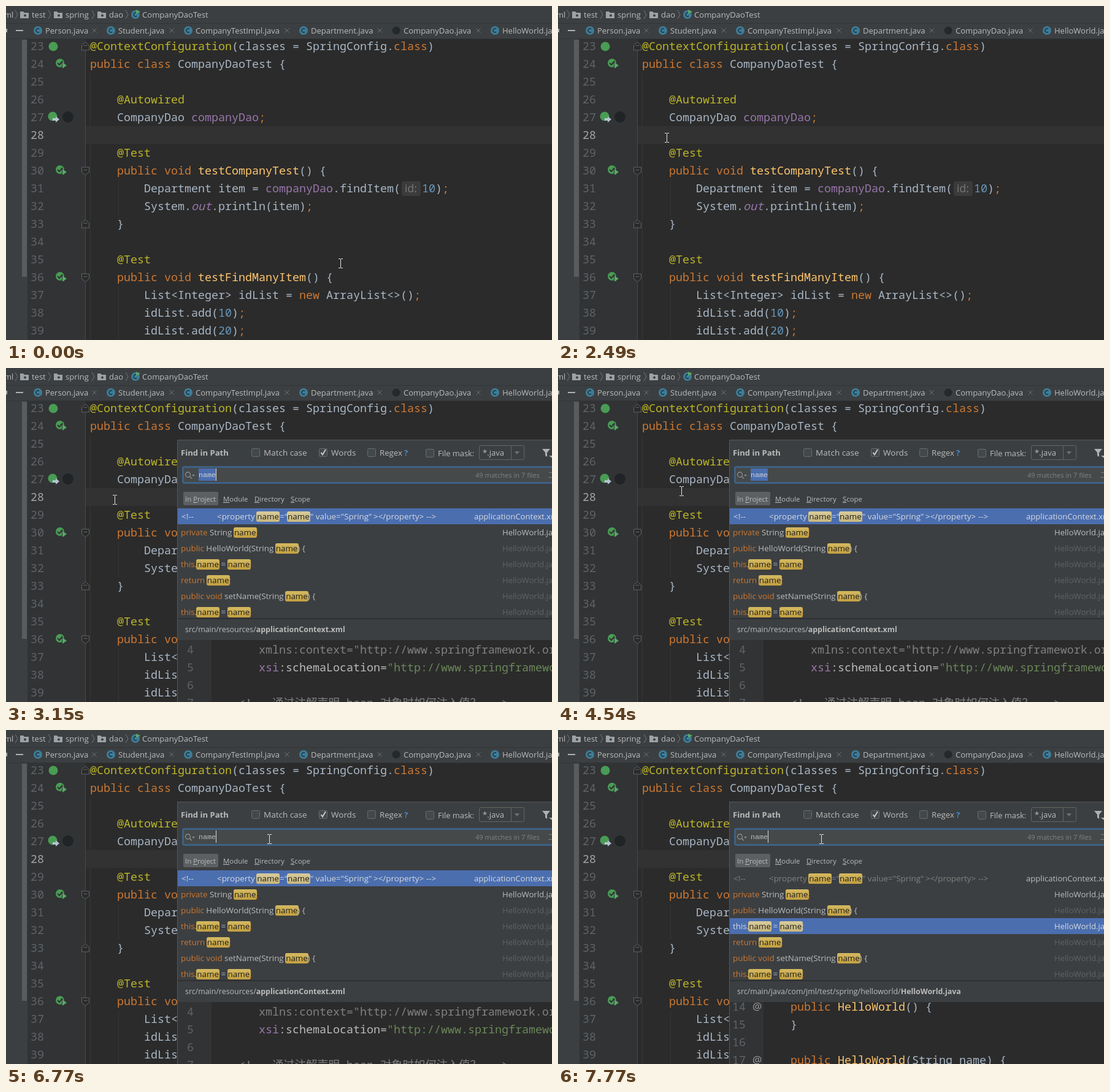
These frames come from a looping animation (890 px wide and 545 px high, 8 s). An HTML page with a canvas:

```html
<!DOCTYPE html>
<html lang="en">
<head>
<meta charset="utf-8">
<title>Find in Path</title>
<style>
html, body { margin: 0; width: 100%; height: 100%; overflow: hidden; background: #2b2b2b; }
canvas { display: block; }
</style>
</head>
<body>
<canvas id="stage" width="890" height="545"></canvas>
<script>
const ctx = document.getElementById('stage').getContext('2d');
const LOOP = 8000, CELL = 11;
const MONO = '"Noto Sans Mono", "Noto Sans CJK SC", "DejaVu Sans Mono", monospace';
const SANS = '"Open Sans", "Noto Sans", sans-serif';
const CODE_FONT = `18.33px ${MONO}`;
const PANEL = '#3c3f41', EDITOR = '#2b2b2b', GUTTER = '#313335', LABEL = '#bbbbbb', GREEN = '#499c54';
const ROW_SIZE = 13.4;
const COLORS = {
  d: '#a9b7c6', k: '#cc7832', a: '#bbb529', f: '#9876aa', m: '#ffc66d', n: '#6897bb',
  c: '#808080', s: '#6a8759', o: '#629755', i: '#9876aa', t: '#629755', x: '#bababa'
};
const STYLES = { i: 'italic ', o: 'italic ', t: 'italic bold ' };

// Styled text: style key and text alternate, separated by backticks.
const pairs = line => {
  const parts = line.split('`'), out = [];
  for (let i = 0; i + 1 < parts.length; i += 2) out.push([parts[i], parts[i + 1]]);
  return out;
};

const SOURCE = [
  'a`@ContextConfiguration`d`(classes = SpringConfig.`k`class`d`)',
  'k`public class `d`CompanyDaoTest {',
  '',
  'a`    @Autowired',
  'd`    CompanyDao `f`companyDao`k`;',
  '',
  'a`    @Test',
  'k`    public void `m`testCompanyTest`d`() {',
  'd`        Department item = `f`companyDao`d`.findItem(',
  'd`        System.`i`out`d`.println(item)`k`;',
  'd`    }',
  '',
  'a`    @Test',
  'k`    public void `m`testFindManyItem`d`() {',
  'd`        List<Integer> idList = `k`new `d`ArrayList<>()`k`;',
  'd`        idList.add(`n`10`d`)`k`;',
  'd`        idList.add(`n`20`d`)`k`;'
];

const XML = {
  4: 'c`       xmlns:context="http://www.springframework.org/schema/context"',
  5: 'f`       xsi`x`:schemaLocation=`s`"http://www.springframework.org/schema/beans',
  7: 'c`    <!-- 通过注解声明 bean 对象时如何注入值？ -->'
};
const JAVA = {
  8: 'o` * `t`@author`o` DORAN',
  9: 'o` */',
  10: 'c`//@Repository',
  11: 'k`public class `d`HelloWorld {',
  12: 'k`    private `d`String `f`name`k`;',
  14: 'k`    public `m`HelloWorld`d`() {',
  15: 'd`    }',
  17: 'k`    public `m`HelloWorld`d`(String name) {',
  18: 'k`        this`d`.`f`name`d` = name`k`;'
};

// A numeric key moves to that x in comment grey; "h" is a highlighted match.
const RESULTS = [
  '286`<!--`344`<property `h`name`446`="`h`name`496`" value="Spring"`599`></property>`685`-->',
  'k`private `d`String `h`name`k`;',
  'k`public `d`HelloWorld(String `h`name`d`) {',
  'k`this`d`.`h`name`d` = `h`name`k`;',
  'k`return `h`name`k`;',
  'k`public void `d`setName(String `h`name`d`) {',
  'k`this`d`.`h`name`d` = `h`name`k`;'
];

const POINTER = [
  [0, 545.5, 420], [70, 530, 414], [200, 470, 385], [350, 330, 310], [480, 220, 245], [620, 150, 219],
  [830, 177.5, 215], [4539, 177.5, 215], [4540, 201.5, 201], [4700, 262, 215], [4850, 320, 229],
  [5050, 380, 222], [5300, 433, 197], [5500, 429.5, 178], [LOOP, 429.5, 178]
];
const EDITOR_CARET = [970, 1500, 1960, 2490];
const FIELD_CARET = [3020, 3480, 4010, 4540, 5070, 5600, 5780, 6310, 6770, 7300, 7770];
const CLICKS = [[900, 1110], [5640, 5850]];

const blinkOn = (toggles, t) => toggles.filter(at => at <= t).length % 2 === 1;
const latest = (steps, t) => steps.filter(([at]) => at <= t).pop()[1];

function rect(x, y, w, h, fill) {
  ctx.fillStyle = fill;
  ctx.fillRect(x, y, w, h);
}

function rounded(x, y, w, h, r, fill, stroke) {
  ctx.beginPath();
  ctx.roundRect(x, y, w, h, r);
  if (fill) { ctx.fillStyle = fill; ctx.fill(); }
  if (stroke) { ctx.strokeStyle = stroke; ctx.lineWidth = 1; ctx.stroke(); }
}

function disc(x, y, r, fill) {
  ctx.beginPath();
  ctx.arc(x, y, r, 0, Math.PI * 2);
  ctx.fillStyle = fill;
  ctx.fill();
}

function trace(points, closed) {
  ctx.beginPath();
  for (let i = 0; i < points.length; i += 2) ctx.lineTo(points[i], points[i + 1]);
  if (closed) ctx.closePath();
}

function line(points, color, width = 1, closed = false) {
  trace(points, closed);
  ctx.strokeStyle = color;
  ctx.lineWidth = width;
  ctx.stroke();
}

function shape(points, fill) {
  trace(points, true);
  ctx.fillStyle = fill;
  ctx.fill();
}

// Draws text around the vertical middle y and returns its width.
function label(text, x, y, size = 13, color = LABEL, weight = '') {
  ctx.font = `${weight} ${size}px ${SANS}`;
  ctx.fillStyle = color;
  ctx.fillText(text, x, y + Math.round(size * 0.38));
  return ctx.measureText(text).width;
}

function code(text, x, y) {
  for (const [key, part] of pairs(text)) {
    ctx.font = (STYLES[key] || '') + CODE_FONT;
    ctx.fillStyle = COLORS[key];
    ctx.fillText(part, x, y + 6);
    x += part.length * CELL;
  }
}

function lineNumber(number, right, y, color = '#606366') {
  ctx.font = CODE_FONT;
  ctx.fillStyle = color;
  ctx.fillText(number, right - String(number).length * CELL, y + 6);
}

function classIcon(x, y) {
  disc(x, y, 7, '#3d7d99');
  ctx.beginPath();
  ctx.arc(x, y, 3, 0.8, Math.PI * 2 - 0.8);
  ctx.strokeStyle = '#22343c';
  ctx.lineWidth = 1.4;
  ctx.stroke();
}

function folder(x, y) {
  shape([x - 7, y - 5, x - 2, y - 5, x, y - 3, x + 7, y - 3, x + 7, y + 6, x - 7, y + 6], '#9da2a6');
  disc(x + 1, y + 1.5, 2, PANEL);
}

function runIcon(x, y) {
  disc(x - 2, y - 1, 7, GREEN);
  line([x - 6, y - 1, x - 3, y + 2, x + 2, y - 4], GUTTER, 2);
  shape([x + 1, y - 3, x + 10, y + 3, x + 1, y + 9], GUTTER);
  shape([x + 2, y - 2, x + 9, y + 3, x + 2, y + 8], '#59a869');
}

function foldMark(y, up) {
  const s = up ? -1 : 1;
  const points = [123.5, y - 6 * s, 135.5, y - 6 * s, 135.5, y + 2 * s, 129.5, y + 7 * s, 123.5, y + 2 * s];
  shape(points, EDITOR);
  line(points, '#606366', 1, true);
  line([126.5, y - 1.5, 132.5, y - 1.5], '#606366');
}

function topBars() {
  rect(0, 0, 890, 54, PANEL);
  rect(0, 28, 890, 1, '#323537');
  rect(0, 53, 890, 1, '#323537');
  label('ml', -3, 14);
  for (const x of [15, 69, 140, 195]) line([x, 7, x + 4, 14, x, 21], '#73777a');
  for (const [x, text] of [[30, 'test'], [85, 'spring'], [156, 'dao']]) {
    folder(x, 14);
    label(text, x + 12, 14);
  }
  classIcon(211, 14);
  shape([212, 6, 219, 9, 212, 13], '#59a869');
  label('CompanyDaoTest', 222, 14, 13.1);

  rect(0, 37, 2, 6, '#afb1b3');
  rect(16, 39, 12, 2, '#afb1b3');
  const tabs = [
    [52, 'Person.java', 144], [171, 'Student.java', 270], [297, 'CompanyTestImpl.java', 458],
    [485, 'Department.java', 609], [636, 'CompanyDao.java', 770], [797, 'HelloWorld.java', 920]
  ];
  for (const [x, text, close] of tabs) {
    if (text === 'CompanyDao.java') disc(x, 40, 6.5, '#24292c');
    else classIcon(x, 40);
    label(text, x + 12, 40);
    line([close - 3.5, 36.5, close + 3.5, 43.5], '#6e7173');
    line([close - 3.5, 43.5, close + 3.5, 36.5], '#6e7173');
  }
}

function editor(t) {
  rect(0, 54, 36, 491, PANEL);
  rect(26, 55, 8, 387, '#595b5d');
  rect(35, 54, 95, 491, GUTTER);
  rect(130, 54, 760, 491, EDITOR);
  rect(130, 196, 760, 29, '#323232');
  rect(129, 66, 1, 479, '#47494a');
  rect(137, 110, 1, 86, '#373737');
  rect(137, 225, 1, 320, '#373737');
  rect(183, 284, 1, 58, '#373737');
  rect(183, 458, 1, 87, '#373737');

  SOURCE.forEach((text, i) => {
    const y = 66 + i * 29;
    lineNumber(23 + i, 62, y, i === 5 ? '#a4a3a3' : undefined);
    code(text, 137, y);
  });
  rounded(645, 286, 31, 24, 4, '#3b3b3b');
  label('id:', 650, 297, 17.5, '#787878');
  code('n`10`d`)`k`;', 678, 298);

  disc(77, 66, 7.5, GREEN);
  for (const y of [94, 268, 442]) runIcon(90, y);
  disc(76, 180, 7.5, GREEN);
  shape([76, 183, 81, 183, 81, 180, 87, 185, 81, 190, 81, 187, 76, 187], '#b5c3d0');
  disc(101, 181, 9, '#202426');
  foldMark(66, true);
  foldMark(269, false);
  foldMark(356, true);
  foldMark(443, false);
  if (blinkOn(EDITOR_CARET, t)) rect(137, 199, 2, 24, '#bbbbbb');
}

function checkbox(x, y, text, size, checked) {
  rounded(x + 0.5, y - 6.5, 13, 13, 2, '#43494a', '#6b6b6b');
  if (checked) line([x + 3.5, y, x + 6, y + 3.5, x + 11, y - 5], '#c8c8c8', 2);
  label(text, x + 20, y, size);
}

function popupHeader(t) {
  label('Find in Path', 285, 138, 13.1, LABEL, 'bold');
  checkbox(400, 138, 'Match case', 13.5);
  checkbox(510, 138, 'Words', 13.5, true);
  checkbox(589, 138, 'Regex', 13.2);
  label('?', 649, 138, 13, '#4a88c7', 'bold');
  checkbox(684, 139, 'File mask:', 12.9);
  rounded(771.5, 126.5, 73, 23, 2, PANEL, '#646464');
  rect(823, 127, 1, 23, '#646464');
  label('*.java', 777, 138);
  shape([829, 136, 837, 136, 833, 141], '#6e7173');
  shape([874, 132, 887, 132, 882, 138, 882, 145, 879, 143, 879, 138], '#afb1b3');
  shape([885, 143, 890, 143, 890, 147], '#afb1b3');

  rounded(287, 160, 620, 29, 4, '#3d6185');
  rounded(290, 163, 620, 23, 1, '#45494a');
  ctx.beginPath();
  ctx.arc(296.5, 174, 4, 0, Math.PI * 2);
  ctx.strokeStyle = '#8b8e90';
  ctx.lineWidth = 1.3;
  ctx.stroke();
  line([299.5, 177, 303, 180.5], '#8b8e90', 1.5);
  shape([303, 174, 308, 174, 305.5, 177], '#8b8e90');
  line([890, 170.5, 885, 170.5], '#7d8082');
  line([890, 178.5, 884, 178.5], '#7d8082');
  if (t < 5780) rect(314, 164, 28, 20, '#4b6eaf');
  ctx.font = '11.7px "Liberation Mono", monospace';
  ctx.fillStyle = t < 5780 ? '#d0d0d0' : LABEL;
  ctx.fillText('name', 314, 178);
  if (blinkOn(FIELD_CARET, t)) rect(342, 164, 1, 20, '#dddddd');

  rounded(289, 202, 57, 22, 2, '#5c6062');
  for (const [x, before, text] of [[292, 'In ', 'Project'], [354, '', 'Module'], [405, '', 'Directory'], [464, '', 'Scope']]) {
    const start = x + label(before, x, 214, 11.4);
    label(text, start, 214, 11.4);
    rect(start, 219, ctx.measureText(text[0]).width, 1, LABEL);
  }
}

function matchBox(x, y, width, selected) {
  const fill = ctx.createLinearGradient(0, y - 8, 0, y + 9);
  fill.addColorStop(0, selected ? '#d8cb9b' : '#d4b961');
  fill.addColorStop(1, selected ? '#c9b77c' : '#c29f40');
  rounded(Math.round(x) - 1, y - 8, Math.round(width) + 2, 17, 3, fill);
}

function results(selected) {
  label('49 matches in 7 files', 765, 175, 11.1, '#808385');
  RESULTS.forEach((text, row) => {
    const y = 242 + row * 26, active = row === selected;
    if (active) rect(280, y - 13, 610, 26, '#4b6eaf');
    let x = 285;
    for (const [key, part] of pairs(text)) {
      if (+key) x = +key;
      const color = key === 'h' ? '#1c1c1c' : active ? '#d6d9de' : +key ? '#808080' : key === 'd' ? LABEL : COLORS[key];
      if (key === 'h') {
        ctx.font = `${ROW_SIZE}px ${SANS}`;
        matchBox(x, y, ctx.measureText(part).width, active);
      }
      x += label(part, x, y, ROW_SIZE, color);
    }
    const fileColor = active ? '#d6d9de' : row < 2 ? LABEL : '#606366';
    if (row) label('HelloWorld.java', 809, y, 13.1, fileColor);
    else label('applicationContext.xml', 763, y, 13.1, fileColor);
  });
}

function preview(first) {
  const isXml = first === 4, lines = isXml ? XML : JAVA;
  const top = isXml ? 460 : 452;
  const path = isXml ? 'src/main/resources/' : 'src/main/java/com/jml/test/spring/helloworld/';
  const width = label(path, 292, 426, 12.4);
  label(isXml ? 'applicationContext.xml' : 'HelloWorld.java', 292 + width, 426, 12.4, LABEL, 'bold');

  ctx.save();
  ctx.beginPath();
  ctx.rect(280, 444, 610, 101);
  ctx.clip();
  rect(280, 444, 55, 101, GUTTER);
  rect(335, 444, 555, 101, EDITOR);
  for (let i = 0; i < 4; i++) {
    const number = first + i, y = top + i * 29, text = lines[number] || '';
    lineNumber(number, 306, y);
    code(text, 335, y);
    if (isXml) continue;
    if (number === 8) rect(368, y + 9, 77, 1, COLORS.o);
    if (number === 10) {
      const wave = [];
      for (let x = 0; x <= 143; x += 2) wave.push(335 + x, y + 9 + (x % 4 ? 2 : 0));
      line(wave, '#85805c');
    }
    if (number === 14 || number === 17) {
      ctx.font = `17px ${SANS}`;
      ctx.fillStyle = '#9da0a2';
      ctx.fillText('@', 317, y + 5);
    }
  }
  ctx.restore();
}

function popup(t) {
  rect(279, 117, 611, 428, '#555759');
  rect(280, 118, 610, 427, PANEL);
  popupHeader(t);
  if (t >= 3090) results(latest([[0, 0], [6900, 1], [7300, 2], [7570, 3]], t));
  else label('Nothing to show', 556, 318, 13.5, '#7b7d7e');
  rect(280, 408, 610, 2, '#2f3133');
  if (t >= 3150) preview(latest([[0, 4], [6900, 8], [7370, 13], [7640, 14]], t));
  else label('Nothing to show', 556, 535, 13.5, '#7b7d7e');
}

function pointer(t) {
  const next = POINTER.findIndex(([at]) => at > t);
  const [t0, x0, y0] = POINTER[next - 1], [t1, x1, y1] = POINTER[next];
  const p = (t - t0) / (t1 - t0);
  const x = Math.floor(x0 + (x1 - x0) * p) + 0.5, y = Math.round(y0 + (y1 - y0) * p);
  if (CLICKS.some(([from, to]) => t >= from && t < to)) disc(x - 2.5, y, 12, 'rgba(255, 255, 0, 0.47)');
  const color = '#e4e4e4';
  line([x, y - 7, x, y + 7], color);
  for (const edge of [y - 7.5, y + 7.5]) {
    line([x - 3.5, edge, x - 0.5, edge], color);
    line([x + 0.5, edge, x + 3.5, edge], color);
  }
}

function draw(now) {
  const t = now % LOOP;
  editor(t);
  topBars();
  if (t >= 3020) popup(t);
  pointer(t);
}

const start = performance.now();
function tick() {
  draw(performance.now() - start);
  requestAnimationFrame(tick);
}
tick();
</script>
</body>
</html>
```
